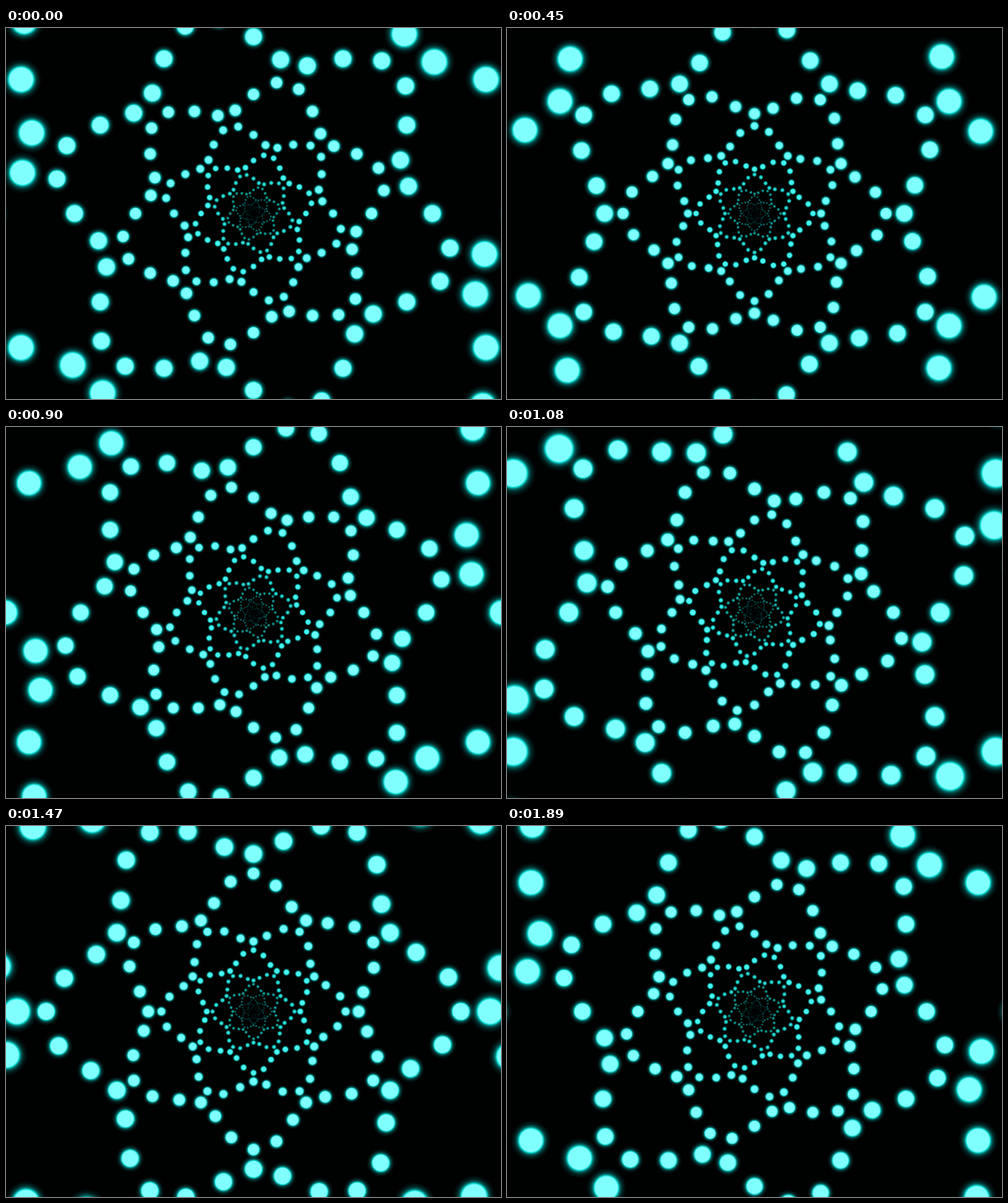
Write an HTML page without scripts that moves like this. It is 801 by 601 pixels and loops after 1.92 s.

```html
<!DOCTYPE html>
<html lang="en">
<head>
<meta charset="utf-8">
<title>Star tunnel</title>
<style>
  /* --t counts 64 ticks of 30 ms per loop */
  @property --t { syntax: "<number>"; inherits: true; initial-value: 0; }
  @keyframes tick { to { --t: 64; } }

  html, body { margin: 0; width: 100%; height: 100%; overflow: hidden; background: #000202; }
  svg { display: block; width: 801px; height: 601px; animation: tick 1920ms steps(64) infinite; }

  /* each ring grows by 1.5 every 16 ticks; neighbours are half a wave apart */
  .ring {
    --size: calc(288 * pow(1.5, var(--k) + var(--t) / 16));
    transform: scale(calc(var(--size) / 100));
    opacity: min(1, .3 + var(--size) / 90);
  }
  .turn { transform: rotate(calc(var(--n) * 10deg)); }
  .dot {
    transform: translateX(calc(100px + 13.7px * sin((var(--t) + .4) * 5.625deg + var(--n) * 60deg + var(--k) * 180deg)));
  }
  .core { fill: #80ffff; opacity: clamp(0, (var(--size) - 20) / 130, 1); }
</style>
</head>
<body>
<svg viewBox="0 0 801 601">
  <defs>
    <radialGradient id="glow">
      <stop offset="0" stop-color="#14f0e6"/>
      <stop offset=".6" stop-color="#0ce6dc"/>
      <stop offset=".68" stop-color="#00bcb4" stop-opacity=".55"/>
      <stop offset=".8" stop-color="#008f8a" stop-opacity=".25"/>
      <stop offset="1" stop-color="#006060" stop-opacity="0"/>
    </radialGradient>
    <g id="dot">
      <g class="dot">
        <circle r="7.8" fill="url(#glow)"/>
        <circle class="core" r="4.5"/>
      </g>
    </g>
    <g id="six">
      <use href="#dot"/>
      <use href="#dot" transform="rotate(60)"/>
      <use href="#dot" transform="rotate(120)"/>
      <use href="#dot" transform="rotate(180)"/>
      <use href="#dot" transform="rotate(240)"/>
      <use href="#dot" transform="rotate(300)"/>
    </g>
    <g id="ring">
      <use class="turn" href="#six" style="--n:0"/>
      <use class="turn" href="#six" style="--n:1"/>
      <use class="turn" href="#six" style="--n:2"/>
      <use class="turn" href="#six" style="--n:3"/>
      <use class="turn" href="#six" style="--n:4"/>
      <use class="turn" href="#six" style="--n:5"/>
    </g>
  </defs>
  <g transform="translate(400.5 300.5)">
    <use class="ring" href="#ring" style="--k:-13"/>
    <use class="ring" href="#ring" style="--k:-12"/>
    <use class="ring" href="#ring" style="--k:-11"/>
    <use class="ring" href="#ring" style="--k:-10"/>
    <use class="ring" href="#ring" style="--k:-9"/>
    <use class="ring" href="#ring" style="--k:-8"/>
    <use class="ring" href="#ring" style="--k:-7"/>
    <use class="ring" href="#ring" style="--k:-6"/>
    <use class="ring" href="#ring" style="--k:-5"/>
    <use class="ring" href="#ring" style="--k:-4"/>
    <use class="ring" href="#ring" style="--k:-3"/>
    <use class="ring" href="#ring" style="--k:-2"/>
    <use class="ring" href="#ring" style="--k:-1"/>
    <use class="ring" href="#ring" style="--k:0"/>
    <use class="ring" href="#ring" style="--k:1"/>
  </g>
</svg>
</body>
</html>
```
